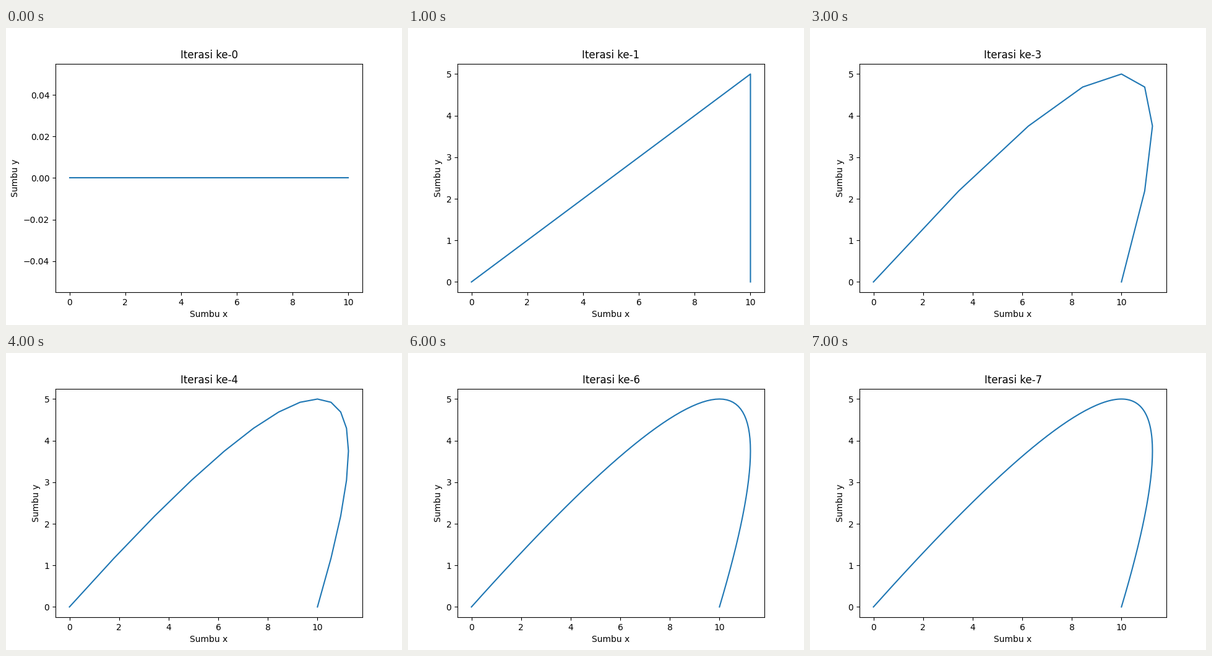
These frames come from a looping animation (640 px wide and 480 px high, 8 s). A matplotlib script:

```python
import numpy as np
import matplotlib.pyplot as plt
from matplotlib.animation import FuncAnimation

CONTROL = np.array([[0, 0], [15, 10], [10, 0]], dtype=float)
STEPS = 8

fig, ax = plt.subplots(figsize=(6.4, 4.8), dpi=100)


def bezier(n):
    """Quadratic Bezier curve after n midpoint subdivisions."""
    t = np.linspace(0, 1, 2**n + 1)[:, None]
    start, mid, end = CONTROL
    return (1 - t)**2 * start + 2 * t * (1 - t) * mid + t**2 * end


def draw(n):
    ax.clear()
    ax.plot(*bezier(n).T, color="tab:blue", linewidth=1.5)
    ax.set_title(f"Iterasi ke-{n}")
    ax.set_xlabel("Sumbu x")
    ax.set_ylabel("Sumbu y")


anim = FuncAnimation(fig, draw, frames=STEPS, init_func=lambda: None,
                     interval=1000, repeat=True, repeat_delay=0)
plt.show()
```
